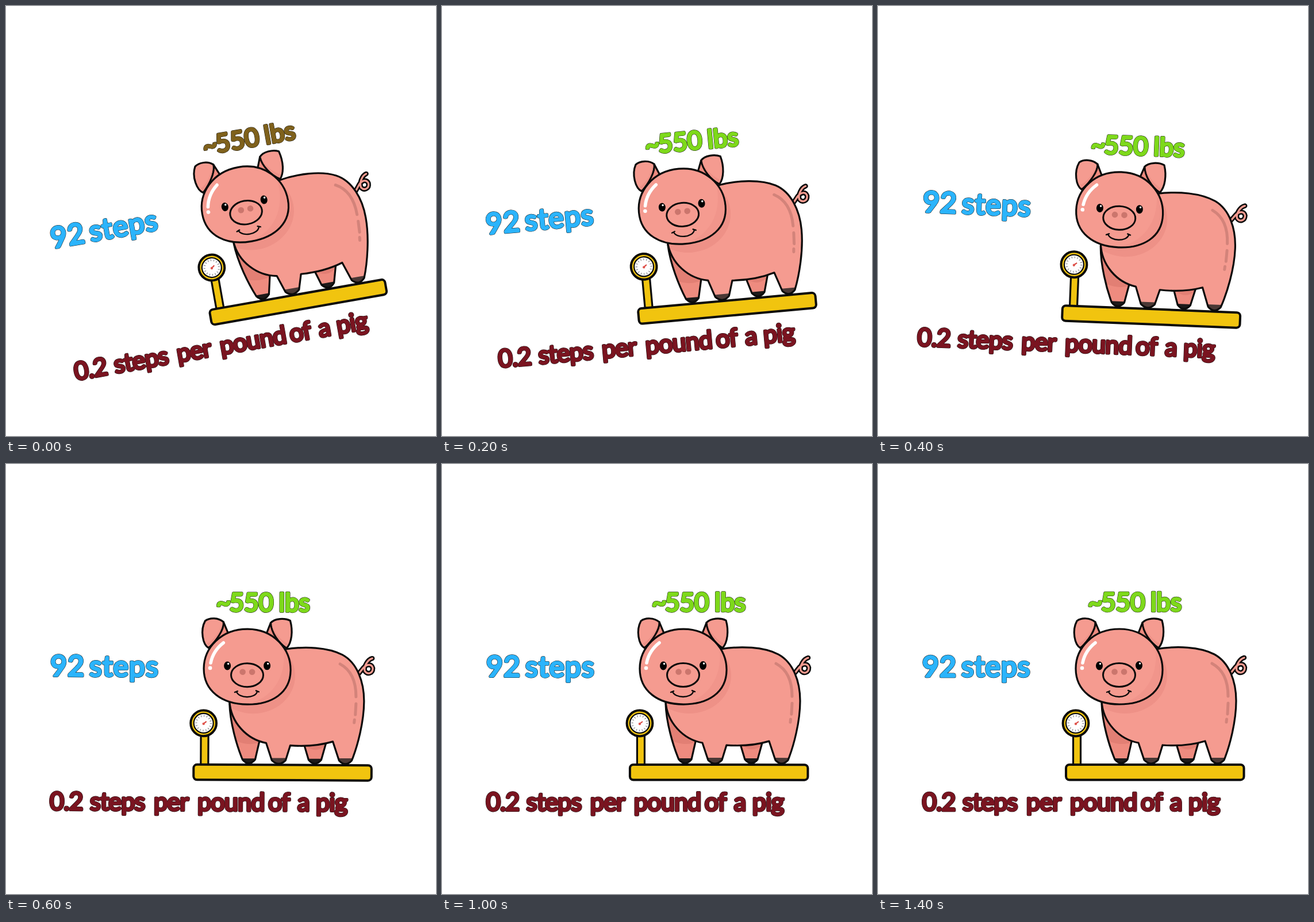
These frames come from a looping animation (748 by 748 pixels, 1500 ms). An HTML page:

```html
<!DOCTYPE html>
<html lang="en">
<head>
<meta charset="utf-8">
<title>Steps per pound</title>
<style>
  html, body { margin: 0; height: 100%; overflow: hidden; background: #fff; }
  svg { display: block; width: 100vw; height: 100vh; }
  text { font-family: Lato, "Open Sans", sans-serif; stroke-linejoin: round; stroke-linecap: round; }
  .line { stroke: #0b0b0b; stroke-width: 3.2; stroke-linejoin: round; stroke-linecap: round; }
  .bare { fill: none; }
  .skin { fill: #f59b90; }
  .shade { fill: #ee9187; }
  .far { fill: #ee8b7f; }
  .deep { fill: #e27f74; }
  .gold { fill: #f1c40f; }
</style>
</head>
<body>
<svg viewBox="0 0 748 748">
  <defs>
    <path id="torso" d="M484 322C520 316 560 318 585 331C611 345 623 378 623 412C623 448 612 490 602 515Q591 527 580 515L569 482Q536 492 495 489L487 515Q475 527 463 515L453 485C420 479 391 450 389 412"/>
    <path id="legs" d="M389 416C390 450 402 490 412 514Q423 527 434 514L444 470M518 484 527 514Q538 527 549 514L559 478"/>
    <path id="curl" d="M637 337C629 339 622 351 624 359C629 366 638 363 638 354C636 346 628 347 622 353L614 363"/>
    <clipPath id="inside"><use href="#torso"/></clipPath>
  </defs>
  <g id="scene">
    <g id="labels"></g>

    <g id="scale">
      <rect class="line gold" x="339.5" y="468" width="13" height="55"/>
      <rect class="line gold" x="327" y="523" width="309.5" height="26.5" rx="6" style="stroke-width:4"/>
      <circle class="line gold" cx="344" cy="451" r="22.4" style="stroke-width:4"/>
      <circle class="line" cx="344" cy="451" r="17" fill="#fff" style="stroke-width:2.2"/>
      <circle cx="344" cy="451" r="12.8" fill="none" stroke="#777" stroke-width="3.4" stroke-dasharray="1 4.03"/>
      <path d="M343 452.5 349 448" stroke="#d9433c" stroke-width="2"/>
      <circle cx="344" cy="452" r="2.2" fill="#e0574f"/>
    </g>

    <g id="tail" fill="none" stroke-linecap="round">
      <use href="#curl" stroke="#0b0b0b" stroke-width="8.4"/>
      <use href="#curl" stroke="#f59b90" stroke-width="3.2"/>
    </g>

    <g id="far-legs">
      <use href="#legs" class="far"/>
      <path class="deep" d="M389 430C392 455 396 470 401 482Q425 492 446 482V450ZM519 487Q540 506 558 487L559 478H518Z"/>
      <path d="M411 512H435L434 514Q423 527 412 514ZM526 512H550L549 514Q538 527 527 514Z" fill="#1d1a1a"/>
      <use href="#legs" class="line bare"/>
    </g>

    <g id="body">
      <use href="#torso" class="skin"/>
      <path d="M462 511H488L487 515Q475 527 463 515ZM579 511H604L602 515Q591 527 580 515Z" fill="#4a3835"/>
      <ellipse class="shade" cx="430" cy="368" rx="73" ry="66" clip-path="url(#inside)"/>
      <use href="#torso" class="line bare"/>
      <path d="M581 347Q609 362 609 404M609 416 608 435M606.5 444 606 449" fill="none" stroke="#d3837a" stroke-width="5" stroke-linecap="round"/>
    </g>

    <g id="ears">
      <path class="line far" d="M378 275 386 294 362 312ZM460 276 453 294 478 312Z"/>
      <path class="line skin" d="M346 273C354 267 369 267 378 275C379 288 366 307 352 320C342 314 337 290 346 273ZM460 276C467 268 484 267 494 272C499 290 497 310 488 320C474 311 461 293 460 276Z"/>
      <path class="shade" d="M376 278C375 290 365 305 353 317L349 312C360 308 370 294 376 278ZM462 279C464 293 475 308 487 317L490 312C478 306 467 294 462 279Z"/>
    </g>

    <g id="head">
      <path class="line skin" d="M420 287C466 287 495 322 495 358C495 398 462 418 420 418C376 418 344 395 344 356C344 320 374 287 420 287Z"/>
      <path class="shade" d="M483 322C490 334 493.3 346 493.3 358C493.3 396 462 416 422 416.3C460 408 488 374 483 322Z" opacity=".55"/>
      <path d="M378 311Q360 325 356 346" fill="none" stroke="#fff" stroke-width="5.6" stroke-linecap="round"/>
      <circle cx="355" cy="355" r="3.3" fill="#fff"/>
      <ellipse cx="385" cy="351" rx="6" ry="7.5"/>
      <ellipse cx="454" cy="350.5" rx="6" ry="7.5"/>
      <path d="M386.5 347.5h.1M455.5 347h.1" stroke="#fff" stroke-width="3.4" stroke-linecap="round"/>
      <ellipse class="line skin" cx="419.5" cy="367" rx="28" ry="20.5" style="stroke-width:3"/>
      <path d="M411.5 361.5h.1M428 361.5h.1" stroke="#cb766d" stroke-width="10.5" stroke-linecap="round"/>
      <path class="line bare" d="M398 397 403 395M401 396C406 408 433 408 437 396M435 394 440 396" style="stroke-width:2.4"/>
    </g>
  </g>
</svg>
<script>
const scene = document.getElementById("scene");
const labels = document.getElementById("labels");

// Each word is laid down twice: a dark rim, then the rounded coloured lettering.
function label(size, spacing, baseline, color, words) {
  const group = document.createElementNS(labels.namespaceURI, "g");
  group.setAttribute("font-size", size);
  group.setAttribute("letter-spacing", spacing);
  group.style.color = color;
  for (const [ink, width] of [["#151515", 4.6], ["currentColor", 3.6]]) {
    for (const [x, word] of words) {
      const text = document.createElementNS(labels.namespaceURI, "text");
      text.textContent = word;
      text.setAttribute("x", x);
      text.setAttribute("y", baseline);
      text.setAttribute("fill", ink);
      text.setAttribute("stroke", ink);
      text.setAttribute("stroke-width", width);
      group.append(text);
    }
  }
  labels.append(group);
  return group;
}

label(50, 1, 370, "#2bb4fc", [[77, "92"], [145, "steps"]]);
const weight = label(44, 0, 256, "#7ed91b", [[365, "~"], [388, "550"], [474, "lbs"]]);
label(43, -0.8, 603, "#7a1420", [
  [77, "0.2"], [147, "steps"], [258, "per"], [334, "pound"],
  [457, "of"], [508, "a"], [540, "pig"]
]);

const LOOP = 1500, STEP = 100;

// Damped swing around the stage centre, advancing in 100 ms steps.
function draw(now) {
  const step = Math.floor(now % LOOP / STEP);
  const t = step * STEP / 1000;
  const swing = 20.2 * Math.exp(-5.07 * t) * Math.sin((1275 * t - 29.7) * Math.PI / 180);
  scene.setAttribute("transform", `rotate(${swing.toFixed(3)} 374 374)`);
  weight.style.color = step ? "#7ed91b" : "#7f611c";
  requestAnimationFrame(draw);
}
draw(performance.now());
</script>
</body>
</html>
```
